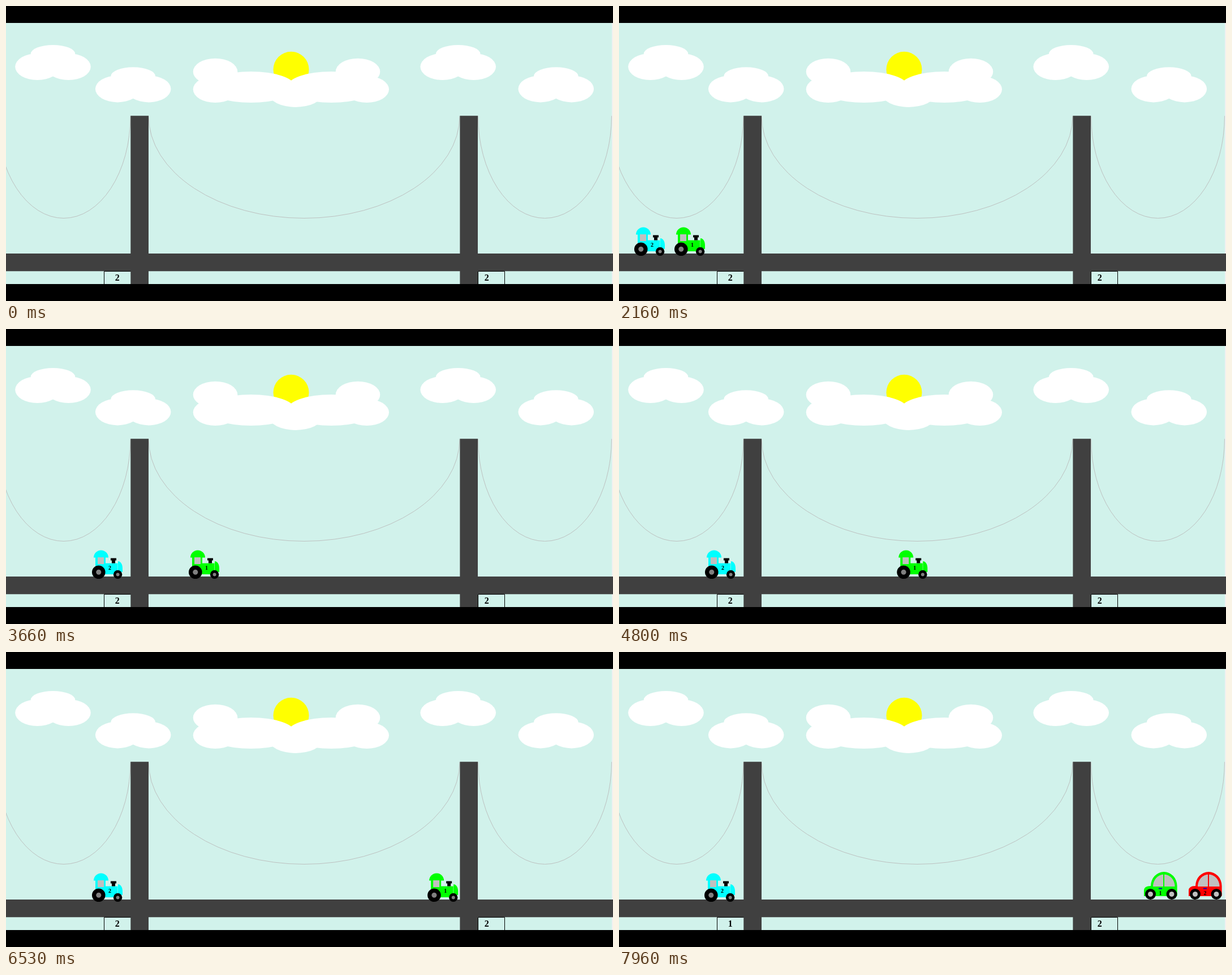
An HTML page for the animation above (8000 ms loop, 1073 px wide and 522 px high).

```html
<!DOCTYPE html>
<html lang="en">
<head>
<meta charset="utf-8">
<title>Bridge traffic</title>
<style>
  html, body { margin: 0; width: 100%; height: 100%; overflow: hidden; background: #000; }
  svg { display: block; }
  text { font: bold 16px "Liberation Serif", "Times New Roman", serif; text-anchor: middle; }
  .tag { font-size: 10px; }
  .cable { fill: none; stroke: #bdc1c0; stroke-width: 1; }
  .sign { fill: none; stroke: #000; stroke-width: 1; }
</style>
</head>
<body>
<svg width="1073" height="522" viewBox="0 0 1073 522">
  <defs>
    <g id="cloud" fill="#fff">
      <ellipse cx="55.5" cy="107.5" rx="39.3" ry="23.6"/>
      <ellipse cx="110.5" cy="107.5" rx="39.3" ry="23.6"/>
      <ellipse cx="83" cy="84.7" rx="39.3" ry="15.7"/>
    </g>
    <g id="tractor">
      <path fill="currentColor" d="M3 13.5a13 13 0 0 1 26 0H24V23.5H45.5V43H6V13.5ZM46 20C51 20 54 26 54 32V39H46Z"/>
      <rect x="10" y="13" width="11" height="12" fill="#c0c0c0"/>
      <path d="M33 14.5h10v4h-2v5h-6v-5h-2Z"/>
      <circle cx="11.8" cy="39.3" r="11.8"/>
      <circle cx="11.8" cy="39.3" r="4.5" fill="#808080"/>
      <circle cx="45.6" cy="43.4" r="7.7"/>
      <circle cx="45.6" cy="43.4" r="3" fill="#808080"/>
    </g>
    <g id="car">
      <path fill="currentColor" d="M12 25a23.3 25 0 0 1 46.6 0V43H0V33Q0 25 12 25Z"/>
      <path fill="#c0c0c0" d="M16 26a19.3 21.5 0 0 1 38.6 0Z"/>
      <path fill="currentColor" d="M34 3h2v24h-2Z"/>
      <path fill="#0000c0" d="M26 28.5h6v2h-6Z"/>
      <circle cx="11.5" cy="39.5" r="9.5"/>
      <circle cx="11.5" cy="39.5" r="4.5" fill="#c0c0c0"/>
      <circle cx="49" cy="39.5" r="9.5"/>
      <circle cx="49" cy="39.5" r="4.5" fill="#c0c0c0"/>
    </g>
  </defs>

  <rect y="30" width="1073" height="462" fill="#d1f2eb"/>
  <rect x="1071" y="30" width="2" height="462" fill="#f0f0f0"/>

  <circle cx="504" cy="112.3" r="31.5" fill="#ff0"/>
  <g fill="#fff">
    <ellipse cx="370" cy="116.3" rx="39.3" ry="23.6"/>
    <ellipse cx="370" cy="147.5" rx="39.3" ry="23.6"/>
    <ellipse cx="433" cy="143.5" rx="78.7" ry="27.5"/>
    <ellipse cx="575" cy="143.5" rx="78.7" ry="27.5"/>
    <ellipse cx="512" cy="155.3" rx="47.2" ry="23.6"/>
    <ellipse cx="622" cy="116.3" rx="39.3" ry="23.6"/>
    <ellipse cx="637.7" cy="147.5" rx="39.3" ry="23.6"/>
  </g>
  <use href="#cloud"/>
  <use href="#cloud" x="141.7" y="39.3"/>
  <use href="#cloud" x="716.2"/>
  <use href="#cloud" x="889.3" y="39.3"/>

  <path class="cable" d="M-16 194.5a118 181 0 0 0 236 0M252 194.5a275 181 0 0 0 550 0M834.5 194.5a118 181 0 0 0 236 0"/>

  <path fill="#404040" d="M0 438H1073V469.3H0ZM220.3 194.3H252V492H220.3ZM802.4 194.3H834V492H802.4Z"/>

  <path class="sign" d="M220.5 469.5h-47V492M834.5 492V469.5h47V492"/>
  <text id="count" x="196.7" y="485.5">2</text>
  <text x="849.7" y="485.5">2</text>

  <g id="blue" color="#0ff"><use href="#tractor"/><text class="tag" x="31.5" y="34.5">2</text></g>
  <g id="green" color="#0f0"><use href="#tractor"/><text class="tag" x="31.5" y="34.5">1</text></g>
  <g id="carGreen" color="#0f0"><use href="#car"/><text class="tag" x="29" y="41">1</text></g>
  <g id="carRed" color="#f00"><use href="#car"/><text class="tag" x="29" y="41">2</text></g>

  <path d="M0 0H1073V29.7H0ZM0 492H1073V522H0Z"/>
</svg>
<script>
  const LOOP = 8000, EXIT = 206, GAP = 71, STOP = 152;

  // Left edges as [tick, x], 30 ticks per second
  const tractorPath = [[34, -54], [59, 71], [65, 98], [84, 195], [110, 323], [134, 441],
                       [144, 491.3], [159, 564], [177, 652.5], [205, 789]];
  const carPath = [[210, 1075], [219, 1032], [235, 951], [239, 928]];

  const el = id => document.getElementById(id);
  const place = (id, x, y) => el(id).setAttribute('transform', `translate(${x} ${y})`);

  function along(path, k) {
    if (k <= path[0][0]) return path[0][1];
    for (let i = 1; i < path.length; i++) {
      const [k0, x0] = path[i - 1], [k1, x1] = path[i];
      if (k <= k1) return x0 + (x1 - x0) * (k - k0) / (k1 - k0);
    }
    return path[path.length - 1][1];
  }

  function draw() {
    const t = performance.now() % LOOP;
    const tick = Math.floor((Math.floor(t / 10) + 0.7) * 0.3);
    const gone = tick >= EXIT;
    const lead = along(tractorPath, tick);
    const car = along(carPath, tick);
    place('green', gone ? -100 : lead, 391);
    place('blue', gone ? STOP - 1 : Math.min(lead - GAP, STOP), 391);
    place('carGreen', car, 389);
    place('carRed', car + 79, 389);
    el('count').textContent = gone ? 1 : 2;
    requestAnimationFrame(draw);
  }
  draw();
</script>
</body>
</html>
```
